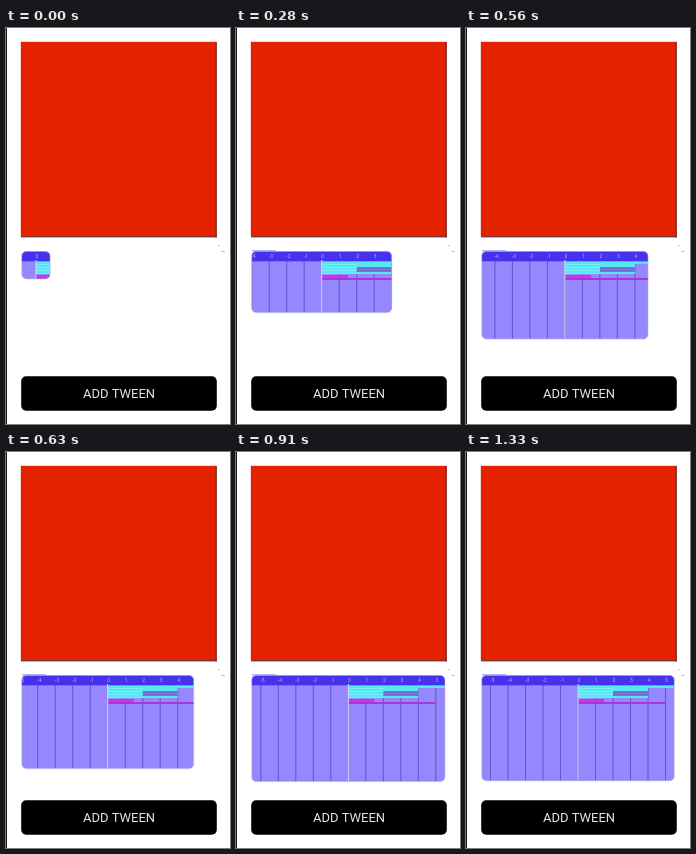
Recreate the animation shown at these times as an HTML page with a canvas. Size 224x396 px, loop 1400 ms.

```html
<!DOCTYPE html>
<html lang="en">
<head>
<meta charset="utf-8">
<title>Resizable timeline</title>
<style>
html, body { margin: 0; width: 100%; height: 100%; overflow: hidden; background: #fff; }
canvas { display: block; width: 224px; height: 396px; }
</style>
</head>
<body>
<canvas id="stage"></canvas>
<script>
const LOOP = 1400, STEP = 70;
const LEFT = 15.6, TOP = 223.3, UNIT = 17.5;
// Panel size while its corner is dragged: time, width, height
const DRAG = [
  [70, 28.6, 27.7], [280, 140.2, 61.5], [420, 155.2, 76.5], [630, 172.2, 93.5],
  [770, 190.6, 103.4], [910, 193.4, 106.4], [1050, 193.4, 106.4], [1330, 192.8, 105.6]
];

const canvas = document.getElementById('stage');
const ctx = canvas.getContext('2d');
const ratio = window.devicePixelRatio || 1;
canvas.width = 224 * ratio;
canvas.height = 396 * ratio;
ctx.scale(ratio, ratio);

function rect(color, x, y, w, h) {
  ctx.fillStyle = color;
  ctx.fillRect(x, y, w, h);
}

function roundPath(x, y, w, h, r) {
  ctx.beginPath();
  ctx.roundRect(x, y, w, h, r);
}

function panelSize(time) {
  if (time <= DRAG[0][0]) return DRAG[0].slice(1);
  const next = DRAG.findIndex(key => key[0] >= time);
  const [t0, w0, h0] = DRAG[next - 1];
  const [t1, w1, h1] = DRAG[next];
  const p = (time - t0) / (t1 - t0);
  return [w0 + (w1 - w0) * p, h0 + (h1 - h0) * p];
}

function drawSurroundings() {
  rect('#fff', 0, 0, 224, 396);
  rect('#151515', 0, 0, 1, 396);
  rect('#e9b0ac', 14.5, 13.5, 196, 195);
  rect('#e42200', 15, 14, 195, 194);
  rect('#803030', 209.3, 14, 1.6, 195.4);
  rect('#803030', 15, 208, 195.9, 1.4);
  rect('#bbb', 212, 217, 1.5, 1);
  rect('#bbb', 215, 223, 4, 0.8);

  ctx.fillStyle = '#000';
  roundPath(15.2, 348.2, 195.6, 34.6, 5);
  ctx.fill();
  ctx.fillStyle = '#e2e2e2';
  ctx.font = '13px Roboto, sans-serif';
  ctx.textAlign = 'center';
  ctx.textBaseline = 'alphabetic';
  ctx.fillText('ADD TWEEN', 113, 370);
}

function drawTracks(zero, right) {
  const bar = (color, from, to, y, h) =>
    rect(color, zero + from * UNIT, y, (to - from) * UNIT, h);
  rect('#55e7f3', zero, 233, right - zero, 3);
  bar('#55e7f3', 0, 4, 236, 10);
  bar('#7770d5', 2, 4, 239, 5);
  for (const y of [236, 239, 242, 245]) bar('#8feef8', 0, 2, y, 0.7);
  bar('#cb35e6', 0, 1.5, 247, 3);
  bar('#a936d6', 0, 5, 250, 2);
}

function drawPanel(w, h, open) {
  const right = LEFT + w;
  const zero = LEFT + w / 2;
  const reach = Math.ceil(w / 2 / UNIT);

  if (open) rect('#8c80ee', 16, 222.4, 24, 1);
  ctx.save();
  roundPath(LEFT, TOP, w, h, 5);
  ctx.clip();
  rect('#9587fd', LEFT, TOP, w, h);
  for (let n = -reach; n <= reach; n++) {
    rect('rgba(75,60,170,.65)', zero + n * UNIT - 0.5, 233, 1, h - 10);
  }
  drawTracks(zero, right);
  rect('#4631ee', LEFT, TOP, w, 10);

  ctx.font = '5px Roboto, sans-serif';
  ctx.textAlign = 'left';
  ctx.fillStyle = '#b9b2fb';
  for (let n = -reach; n <= reach; n++) {
    ctx.fillText(n, zero + n * UNIT - 0.4, 230.3);
  }
  rect('#e0dcfa', zero - 0.5, 232, 1, h - 9);
  ctx.restore();

  ctx.strokeStyle = 'rgba(185,180,210,.7)';
  ctx.lineWidth = 0.8;
  roundPath(LEFT + 0.1, TOP + 0.1, w - 0.2, h - 0.2, 5);
  ctx.stroke();
}

const start = performance.now();
function draw() {
  const elapsed = (performance.now() - start) % LOOP;
  const time = Math.floor(elapsed / STEP) * STEP;
  drawSurroundings();
  drawPanel(...panelSize(time), time >= 140);
  requestAnimationFrame(draw);
}
draw();
</script>
</body>
</html>
```
